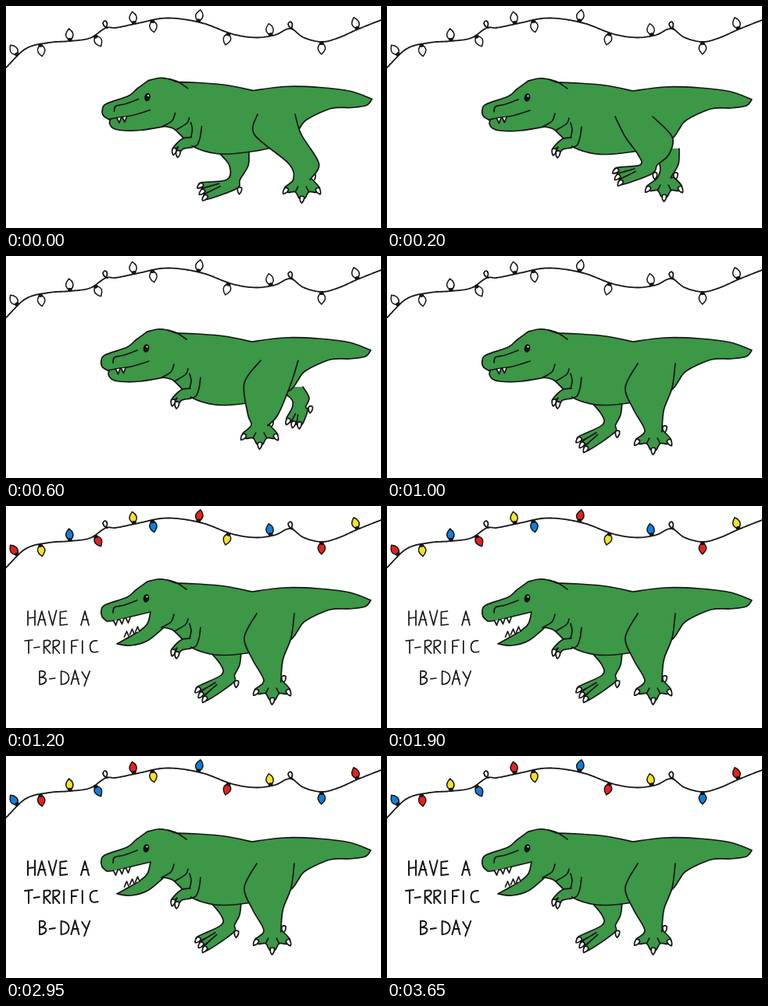
Animation of 480 by 285 pixels, one loop 4000 ms. Source, as an HTML page with a canvas:

```html
<!DOCTYPE html>
<html lang="en">
<head>
<meta charset="utf-8">
<title>Have a T-rrific B-day</title>
<style>
html, body { margin: 0; width: 100%; height: 100%; overflow: hidden; background: #fff; }
canvas { display: block; width: 480px; height: 285px; }
</style>
</head>
<body>
<canvas id="stage" width="480" height="285" role="img" aria-label="HAVE A T-RRIFIC B-DAY"></canvas>
<script>
const ctx = document.getElementById("stage").getContext("2d");
const INK = "#151515", GREEN = "#3c9747";
const BULB_COLORS = ["#e8201c", "#f3e12a", "#0f7fdc"];

const points = text => text.trim().split(/\s+/).map(p => p.split(",").map(Number));
const polar = (x, y, deg, r) => [x + r * Math.cos(deg * Math.PI / 180), y + r * Math.sin(deg * Math.PI / 180)];

// Smooth curve through the points; continues the current path.
function spline(pts) {
  ctx.lineTo(...pts[0]);
  for (let i = 0; i < pts.length - 1; i++) {
    const b = pts[i], c = pts[i + 1], a = pts[i - 1] || b, d = pts[i + 2] || c;
    ctx.bezierCurveTo(
      b[0] + (c[0] - a[0]) / 6, b[1] + (c[1] - a[1]) / 6,
      c[0] - (d[0] - b[0]) / 6, c[1] - (d[1] - b[1]) / 6, c[0], c[1]);
  }
}

function paint(fill) {
  if (fill) { ctx.fillStyle = fill; ctx.fill(); }
  ctx.stroke();
}

// "|" separates smooth runs that meet at a corner.
function trace(text, fill) {
  ctx.beginPath();
  text.split("|").forEach(run => spline(points(run)));
  paint(fill);
}

function shape(d, x, y, turn = 0, fill) {
  ctx.save();
  ctx.translate(x, y);
  ctx.rotate(turn);
  const path = new Path2D(d);
  if (fill) { ctx.fillStyle = fill; ctx.fill(path); }
  ctx.stroke(path);
  ctx.restore();
}

function oval(x, y, rx, ry, turn, fill) {
  ctx.fillStyle = fill;
  ctx.beginPath();
  ctx.ellipse(x, y, rx, ry, turn, 0, 2 * Math.PI);
  ctx.fill();
}

// Garland: a hanging wire with two loops, bulbs alternating above and below
const WIRE = points("0,79 25,55 55,47 82,45 108,41 128,28 140,28 165,23 205,15.5 250,21.5 " +
  "290,36 320,40.5 345,37 364,29 380,40 404,46 425,41 450,30 480,18");
const BULB_XS = [15, 44, 82, 114, 164, 187, 246, 285, 339, 404, 450];

function wireY(x) {
  const i = Math.max(0, WIRE.findIndex(p => p[0] > x) - 1);
  const slope = k => {
    const a = WIRE[Math.max(k - 1, 0)], b = WIRE[Math.min(k + 1, WIRE.length - 1)];
    return (b[1] - a[1]) / (b[0] - a[0]);
  };
  const [x0, y0] = WIRE[i], [x1, y1] = WIRE[i + 1], w = x1 - x0, u = (x - x0) / w;
  const ease = u * u * (3 - 2 * u);
  return y0 + (y1 - y0) * ease + w * u * (1 - u) * (slope(i) * (1 - u) - slope(i + 1) * u);
}

function garland(lit, shift) {
  ctx.lineWidth = 1.8;
  ctx.beginPath();
  for (let x = 0; x < 480; x += 2) ctx.lineTo(x, wireY(x));
  ctx.lineTo(...WIRE.at(-1));
  ctx.stroke();
  for (const x of [128, 365]) shape("M0 0C4-8-2-12-4-6Q-3-1 2 0", x, wireY(x));
  ctx.lineWidth = 1.5;
  BULB_XS.forEach((x, i) => {
    const y = wireY(x), tilt = .8 * Math.atan((wireY(x + 2) - wireY(x - 2)) / 4) + i % 2 * Math.PI;
    shape("M-2.5-3C-7-8-4-12 0-16C5-12 6-7 2.5-3Z", x, y, tilt, lit ? BULB_COLORS[(i + shift) % 3] : "#fff");
    oval(x + 2 * Math.sin(tilt), y - 2 * Math.cos(tilt), 3, 2, tilt, INK);
  });
}

// Hand lettering, one stroke drawing per letter on an even pitch
const GLYPHS = {
  H: "M1-18V0M10-19V0M1-9L10-10",
  A: "M0 0L5-18L10 0M2-7H9",
  V: "M0-18L5 0L10-19",
  E: "M9-18L1-17V0L10-1M1-9H8",
  T: "M0-16L10-17M5-16V0",
  "-": "M0-7L7-8",
  R: "M1 0V-16Q10-18 9-13Q8-9 2-8L9 0",
  I: "M3-16V0",
  F: "M9-17L1-16V0M1-9H7",
  C: "M10-16Q1-17 1-8Q1 1 11-2",
  B: "M1 0V-17Q9-18 8-13Q7-10 2-9Q11-9 9-4Q7 0 1 0",
  D: "M1 0V-17Q11-16 11-8Q10 0 1 0",
  Y: "M0-16L5-8M10-17L3 2"
};

function write(text, x, y, pitch) {
  [...text].forEach((ch, i) => GLYPHS[ch] && shape(GLYPHS[ch], x + i * pitch, y));
}

function lettering(weight) {
  ctx.lineWidth = weight;
  write("HAVE A", 27, 153, 13.8);
  write("T-RRIFIC", 24, 189, 11.8);
  write("B-DAY", 42, 229, 13.8);
}

// Legs: centre points from hip to ankle, half-widths, and a foot of fanned toes
const NEAR_WIDTHS = [24, 30, 19.5, 11], FAR_WIDTHS = [20, 12, 8.5];
const foot = (dir, spread, reach) => [[dir, spread], [reach, 0]];
const PLANTED = foot(90, 55, 25), SWINGING = foot(159, 11, 42), TRAILING = foot(108, 20, 22);

const POSES = {
  0: {
    near: [...points("346,139 348,165 381,202 379,222"), ...PLANTED],
    far: [...points("291,187 298,205 291,223"), ...SWINGING]
  },
  1: {
    near: [...points("316,142 335,168 341,191 335,204"), ...SWINGING],
    far: [...points("354,183 361,203 355,220"), ...PLANTED]
  },
  3: {
    near: [...points("350,134 335,163 329,203 325,217"), ...PLANTED],
    far: [...points("360,168 376,182 375,194"), ...TRAILING]
  },
  5: {
    near: [...points("345,138 335,169 335,197 341,224"), ...PLANTED],
    far: [...points("281,187 287,204 284,217"), ...foot(144, 10, 42)]
  }
};

const midway = (a, b) => a.map((p, i) => p.map((v, j) => (v + b[i][j]) / 2));

// Steps without a pose of their own lie halfway between their neighbours.
function poseAt(step) {
  if (POSES[step]) return POSES[step];
  const a = POSES[step - 1], b = POSES[step + 1];
  return { near: midway(a.near, b.near), far: midway(a.far, b.far) };
}

function claw(x, y, deg) {
  shape("M-2.6-2Q-3.5 3-.6 6Q3 3 2.5-2Q0-4-2.6-2Z", x, y, (deg - 90) * Math.PI / 300, "#fff");
}

function leg(joints, widths) {
  const bones = joints.slice(0, widths.length);
  const [[dir, spread], [reach]] = joints.slice(widths.length);
  const [x, y] = bones.at(-1);
  const front = bones.map(([bx, by], i) => [bx - widths[i], by]);
  const back = bones.map(([bx, by], i) => [bx + widths[i], by]).reverse();
  const toes = [1, 0, -1].map(k => dir + k * spread);
  const gaps = [.5, -.5].map(k => dir + k * spread);
  const sole = [];
  toes.forEach((deg, i) => {
    const tip = polar(x, y, deg, reach);
    sole.push(polar(...tip, deg + 90, 3.5), polar(...tip, deg - 90, 3.5));
    if (i < 2) sole.push(polar(x, y, gaps[i], reach * .75));
  });
  const spur = polar(x, y, dir - 102, 15);
  claw(...spur, 90);
  ctx.beginPath();
  spline([...front, ...sole, polar(x, y, dir - 90, 12), ...back]);
  paint(GREEN);
  for (const deg of gaps) {
    ctx.beginPath();
    ctx.moveTo(...polar(x, y, deg, reach * .75));
    ctx.lineTo(...polar(x, y, deg, reach * .45));
    ctx.stroke();
  }
  toes.forEach(deg => claw(...polar(x, y, deg, reach), deg));
}

// Body outline, clockwise from the brow
const TORSO = "181,97 194,94 206,95 217,99|217,99 245,100 280,103 315,110|" +
  "315,110 355,105 400,106 440,111 467,121|467,121 460,129 440,132 415,133 384,147 374,159|" +
  "374,159 364,172 340,183 300,190 268,191 238,182 222,167 213,159 202,156|";
const SHUT_JAW = "202,156 170,161 145,161 135,158 131,152 132,148|130,147 ";
const OPEN_JAW = "202,156 181,173 160,179 142,177|142,177 170,161 181,151 185,136|" +
  "185,136 160,142 140,147 129,148|129,148 ";
const SNOUT = "123,142 122,134 127,127 155,117 166,108 181,97";
const MARKS = [
  "207,95 219,99 231,107", "137,137 139,130 152,127 168,121",
  "215,139 211,149 199,156", "233,145 230,152 217,160",
  "235,151 237,160 235,170", "249,156 247,170 243,180 235,183"
];
const ARM = "236,170 224,172 212,184 214,187 219,182 216,189 220,191 225,185 236,183";

const tooth = (x, y, height) => shape(`M-2.5 0L.5 ${height}L3-1`, x, y, 0, "#fff");

function teeth(open) {
  for (let i = 0; i < 3; i++) {
    if (open) {
      tooth(140 + 8 * i, 147 - 1.5 * i, 6);
      tooth(154 + 7 * i, 168 - 3 * i, -7);
    } else if (i < 2) tooth(143 + 7 * i, 145.5 - i, 6);
  }
}

function dinosaur(step, open) {
  const { near, far } = poseAt(step);
  ctx.lineWidth = 1.7;
  leg(far, FAR_WIDTHS);
  const lift = Math.max(0, 1.5 - step / 2);
  ctx.save();
  ctx.translate(step ? 0 : 1.5, -lift);
  trace(TORSO + (open ? OPEN_JAW : SHUT_JAW) + SNOUT, GREEN);
  MARKS.forEach(line => trace(line));
  if (!open) trace("130,147 140,145 160,142 183,135");
  teeth(open);
  trace(ARM, GREEN);
  claw(214, 187, 100);
  claw(219, 190, 95);
  oval(179.5, 118.5, 3.8, 5.4, .2, INK);
  oval(180.5, 116.5, 1.1, 1.1, 0, "#fff");
  ctx.restore();
  leg(near, NEAR_WIDTHS);
}

function frame() {
  const t = performance.now() % 4000;
  const party = t >= 1200;
  const blink = party ? Math.floor((t - 1200) / 350) % 2 : 0;
  ctx.fillStyle = "#fff";
  ctx.fillRect(0, 0, 480, 285);
  ctx.strokeStyle = INK;
  ctx.lineCap = ctx.lineJoin = "round";
  garland(party, blink * 2);
  dinosaur(party ? 5 : Math.floor(t / 200), party);
  if (party) lettering(blink ? 2 : 1.7);
  requestAnimationFrame(frame);
}
frame();
</script>
</body>
</html>
```
